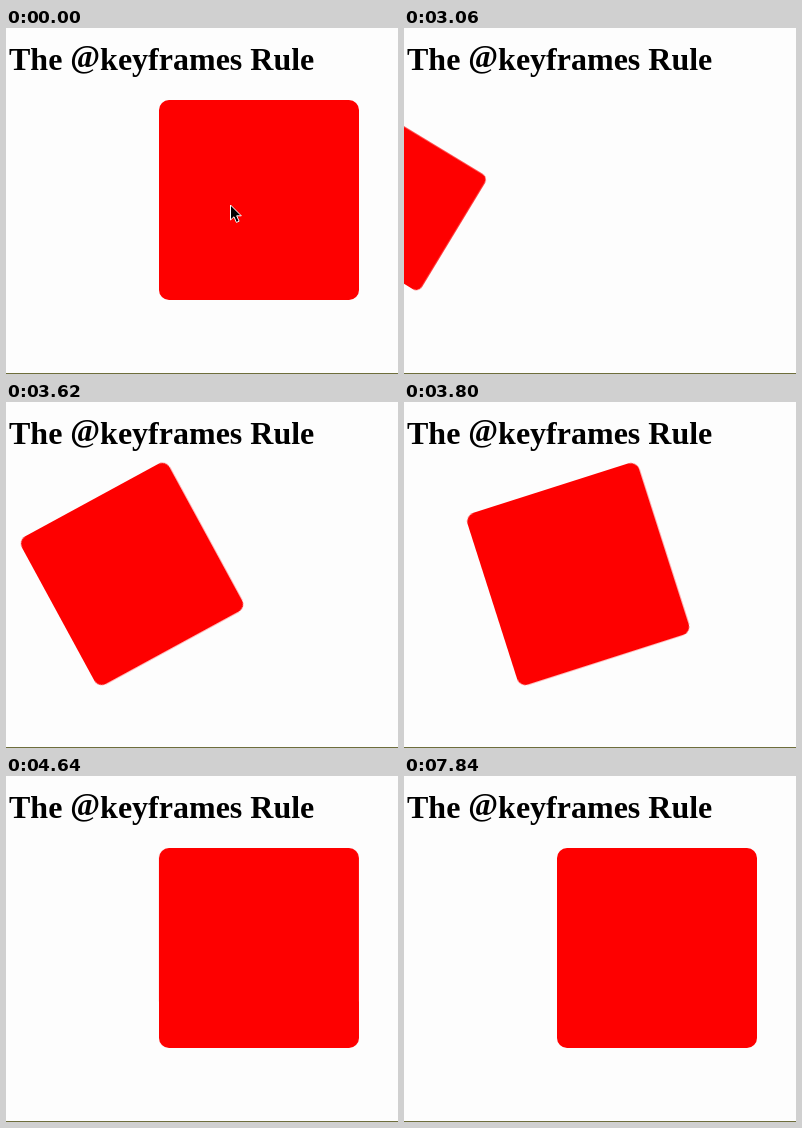
Recreate the animation shown at these times as an HTML page. Size 392 by 346 pixels, loop 8 s.

```html
<!DOCTYPE html>
<html lang="en">
<head>
<meta charset="utf-8">
<title>The @keyframes Rule</title>
<style>
  html, body { margin: 0; width: 100%; height: 100%; overflow: hidden; background: #fdfdfd; }
  svg { position: absolute; left: 0; top: 0; display: block; }
  .title { font: bold 32px "Liberation Serif", "Times New Roman", serif; }
  .box {
    position: absolute; left: 153px; top: 72px; width: 200px; height: 200px;
    border-radius: 10px; background: #fe0000;
    animation: roll 2s ease-in-out both paused;
  }
  @keyframes roll {
    from { transform: translateX(-400px) rotate(-90deg) scale(.5); }
    to { transform: translateX(0) rotate(0deg) scale(1); }
  }
</style>
</head>
<body>
<svg width="392" height="346">
  <text class="title" x="3" y="42">The <tspan dy="-3.5">@</tspan><tspan dy="3.5">keyframes Rule</tspan></text>
  <rect y="345" width="392" height="1" fill="#6e6e3c"/>
</svg>
<div class="box" id="box"></div>
<svg width="392" height="346">
  <path id="cursor" d="M0 0V15L3.5 11.8L5.9 17.4L8.6 16.2L6.2 10.8H10.8Z"
        fill="#000" stroke="#fff" stroke-width="1" stroke-linejoin="round"/>
</svg>
<script>
  const LOOP = 8000, FPS = 30;
  const ROLL_START = 40, ROLL_OFFSET = 40.45, ROLL_TIME = 2;
  const CURSOR_EXIT = 8;
  const box = document.getElementById('box');
  const cursor = document.getElementById('cursor');

  // Steps last 20, 100 and 20 ms in turn.
  function stepAt(ms) {
    const rest = ms % 140;
    return Math.floor(ms / 140) * 3 + (rest < 20 ? 0 : rest < 120 ? 1 : 2);
  }

  function draw(ms) {
    const step = stepAt(ms);
    const sec = step < ROLL_START ? ROLL_TIME
      : Math.min(ROLL_TIME, Math.max(0, (step - ROLL_OFFSET) / FPS));
    box.style.animationDelay = -sec + 's';

    const k = (step / (CURSOR_EXIT - 1)) ** 2;
    cursor.style.display = step < CURSOR_EXIT ? '' : 'none';
    cursor.setAttribute('transform', `translate(${224.5 + 142 * k} ${177 - 50 * k})`);
  }

  const start = performance.now();
  function tick() {
    draw((performance.now() - start) % LOOP);
    requestAnimationFrame(tick);
  }
  tick();
</script>
</body>
</html>
```
